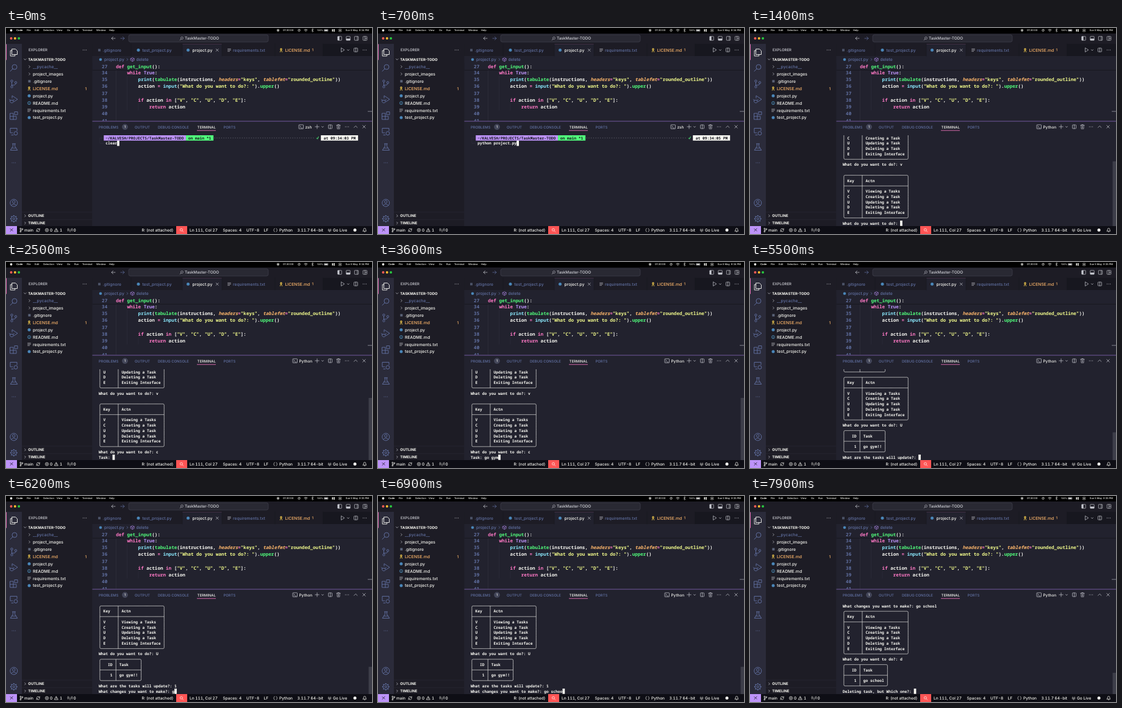
Write an HTML page that moves like this. It is 600x338 px and loops after 8 s.

```html
<!DOCTYPE html>
<html lang="en">
<head>
<meta charset="utf-8">
<title>Terminal to-do session</title>
<style>
html, body { margin: 0; width: 100%; height: 100%; overflow: hidden; background: #22222e; }
svg { display: block; width: 600px; height: 338px; }
text { font-family: Inter, "Open Sans", sans-serif; font-weight: 500; white-space: pre; text-rendering: geometricPrecision; }
.mono text { font-family: "Noto Sans Mono", "DejaVu Sans Mono", monospace; font-weight: 600; }
.status text { font-variant-numeric: tabular-nums; }
text.bold { font-weight: 700; }
</style>
</head>
<body>
<svg id="stage" viewBox="0 0 600 338" xmlns="http://www.w3.org/2000/svg"></svg>
<script>
const C = {
  bg: '#22222e', side: '#1d1c25', bar: '#2b2b3a', dark: '#17171f', base: '#0e0e15', fg: '#f8f8f2', dim: '#6272a4',
  pink: '#ff79c6', purple: '#bd93f9', green: '#50fa7b', cyan: '#8be9fd', orange: '#ffb86c',
  yellow: '#f1fa8c', red: '#ff5555', blue: '#4a86b8', icon: '#c9cad2'
};

const esc = s => s.replace(/&/g, '&amp;').replace(/</g, '&lt;');
const rect = (x, y, w, h, fill, more = '') =>
  `<rect x="${x}" y="${y}" width="${w}" height="${h}" fill="${fill}" ${more}/>`;
const dot = (x, y, r, fill) => `<circle cx="${x}" cy="${y}" r="${r}" fill="${fill}"/>`;
const line = (d, color = C.icon, w = 0.7) =>
  `<path d="${d}" fill="none" stroke="${color}" stroke-width="${w}" stroke-linecap="round" stroke-linejoin="round"/>`;
const ring = (x, y, r, color = C.icon, w = 0.7) =>
  `<circle cx="${x}" cy="${y}" r="${r}" fill="none" stroke="${color}" stroke-width="${w}"/>`;
const frame = (x, y, w, h, color = C.icon, lw = 0.7) =>
  rect(x, y, w, h, 'none', `stroke="${color}" stroke-width="${lw}" rx="0.6"`);
// y is the vertical middle of the text
const label = (x, y, s, size, fill = C.fg, more = '') =>
  `<text x="${x}" y="${y + size * 0.36}" font-size="${size}" fill="${fill}" ${more}>${esc(s)}</text>`;
const bold = 'class="bold"';
const dots = (x, y, color = C.icon) => [-2.6, 0, 2.6].map(d => dot(x + d, y, 0.6, color)).join('');
const down = (x, y, color = C.icon, r = 1.7) => line(`M${x - r} ${y - r / 2}l${r} ${r} ${r} ${-r}`, color);
const right = (x, y, color = C.icon, r = 1.7) => line(`M${x - r / 2} ${y - r}l${r} ${r} ${-r} ${r}`, color);
const cross = (x, y, r = 1.9, color = C.icon) =>
  line(`M${x - r} ${y - r}l${2 * r} ${2 * r}M${x + r} ${y - r}l${-2 * r} ${2 * r}`, color);
const lens = (x, y, r, color, w) => ring(x + r * .25, y - r * .25, r, color, w) +
  line(`M${x - r * .5} ${y + r * .5}l${-r} ${r}`, color, w);
const key = (x, y) => ring(x, y - 1.4, 1.2, '#e5c04b', 1.2) + line(`M${x - .5} ${y}l-1 3M${x + .5} ${y}l1 3`, '#e5c04b', 1);
const list = (x, y) => line([-2, 0, 2].map(d => `M${x - 2.4} ${y + d}h${d > 0 ? 3 : 4.8}`).join(''), C.icon, .7);
const split = (x, y) => frame(x - 3, y - 3, 6, 6) + line(`M${x} ${y - 3}v6`);

function menuBar() {
  const items = [['File', 34], ['Edit', 47], ['Selection', 61], ['View', 83], ['Go', 100], ['Run', 112],
    ['Terminal', 125], ['Window', 148], ['Help', 169]];
  return rect(0, 0, 600, 9, '#000') + dot(8.5, 3.8, 1.9, C.fg) +
    label(17, 3.8, 'Code', 4.1, C.fg, bold) +
    items.map(([s, x]) => label(x, 3.8, s, 4)).join('') +
    ring(446, 3.8, 1.8, C.fg, .6) + dot(446, 3.8, 1, C.fg) + label(454, 3.8, '01:30:00', 4.1) +
    ring(480.5, 3.8, 1.7, C.fg, .7) + line('M480.5 3.8l1-1', C.fg, .6) +
    line('M489 3q2.5-2 5 0M490 4.3q1.5-1.2 3 0M491.5 5.5h.1', C.fg, .7) +
    line('M501 2.4l3 3-1.5 1.2v-5.6l1.5 1.2-3 3', C.fg, .5) +
    label(510, 3.8, '100%', 3.7) + frame(521.5, 2.2, 6.5, 3.2, C.icon, .5) + rect(522.2, 2.9, 5.1, 1.8, C.fg) +
    rect(534.5, 2, 1.7, 3.8, C.fg) + rect(537, 2, 2, 1.6, C.fg) + rect(537, 4.2, 2, 1.6, C.fg) +
    frame(545.5, 2, 4.4, 1.5, C.fg, .5) + frame(545.5, 4.5, 4.4, 1.5, C.fg, .5) +
    '<text id="clock" x="595" y="5.25" font-size="4" fill="#f8f8f2" text-anchor="end"></text>';
}

function titleBar() {
  const pane = (x, part) => frame(x - 3.2, 13.8, 6.4, 6.4) + part;
  return rect(0, 9, 600, 17, C.side) +
    dot(8.5, 17, 2, '#ff5f57') + dot(14.8, 17, 2, '#febc2e') + dot(21.1, 17, 2, '#28c840') +
    line('M179 17h-6m2.5-2.5l-2.5 2.5 2.5 2.5') + line('M188 17h6m-2.5-2.5l2.5 2.5-2.5 2.5', C.dim) +
    rect(201, 11, 229, 12, '#292933', 'rx="3" stroke="#454653" stroke-width=".6"') +
    lens(288, 17, 1.9, C.icon, .6) + label(293, 17, 'TaskMaster-TODO', 6.4, '#d5d6dc') +
    pane(547, rect(543.8, 13.8, 2.8, 6.4, C.icon)) + pane(561, rect(557.8, 17.4, 6.4, 2.8, C.icon)) +
    pane(574.5, line('M575.8 14v6')) + pane(588.5, line('M588.5 14v6M588.5 17h3'));
}

function activityBar() {
  const c = C.dim, w = .9;
  return rect(0, 26, 26, 299, C.bar) + rect(0, 26.5, .9, 26, C.pink) +
    line('M10 34.5h5.5l3 3v6H10zM10 37H7.2v9h7.5v-2.5', C.fg, w) +
    lens(13, 65, 4, c, w) +
    ring(9.5, 87, 1.7, c, w) + ring(9.5, 96.5, 1.7, c, w) + ring(16, 89.5, 1.7, c, w) +
    line('M9.5 89v5.5M16 91.5q0 2.5-6.5 2.5', c, w) +
    line('M10 115v-4l9 6-6 4M7 118.5h5v3q-2.5 3-5 0zM5.5 117l1.5 1.5M13.5 117l-1.5 1.5', c, w) +
    line('M7 140h5v5h5v5H7zM7 145h5v5M14.3 137.5h4.7v4.7h-4.7z', c, w) +
    line('M11 172H7v-7.5h11v4M9 175.5h3', c, w) + ring(16, 172.8, 2.9, c, w) +
    line('M10.5 190h5M11.5 190v4l-4.3 6.5h11.6L14.5 194v-4M9.5 197h7', c, w) + dots(12.7, 221, c) +
    ring(12.8, 287, 6, c, w) + ring(12.8, 285.2, 2.2, c, w) + line('M8.7 291q4.1-4.5 8.2 0', c, w) +
    ring(12.8, 313, 4.4, c, w) + ring(12.8, 313, 1.7, c, w) +
    [0, 45, 90, 135].map(a =>
      `<g transform="rotate(${a} 12.8 313)">${line('M12.8 308.3v-.7M12.8 317.7v.7', c, 1.4)}</g>`).join('');
}

function sidebar() {
  const files = ['__pycache__', 'project_images', '.gitignore', 'LICENSE.md', 'project.py', 'README.md',
    'requirements.txt', 'test_project.py'];
  const mark = (i, y) => i < 2 ? right(38.5, y)
    : i === 2 ? rect(36.4, y - 2, 4, 4, '#5a6277')
    : i === 3 ? key(38, y)
    : i === 5 ? ring(38, y, 2.5, '#58a6d8') + line(`M38 ${y}v1.3M38 ${y - 1.3}v.05`, '#58a6d8')
    : i === 6 ? list(38, y) : dot(38, y, 2.5, C.blue);
  return rect(26, 26, 115.5, 299, C.side) + label(37, 36.3, 'EXPLORER', 6, '#d5d6dc') + dots(129, 36) +
    down(31.3, 51.5) + label(36.3, 51.5, 'TASKMASTER-TODO', 6, C.fg, bold) +
    files.map((s, i) => {
      const y = 63.5 + i * 11.93;
      return mark(i, y) + label(44, y, s, 6.85, i === 0 ? C.dim : i === 3 ? C.orange : C.fg);
    }).join('') +
    label(129.5, 99.3, '1', 6.4, C.orange) +
    line('M26 302h115M26 314.3h115', '#2e2e3a', .5) +
    right(31.5, 308.2) + label(36.3, 308.2, 'OUTLINE', 6, C.fg, bold) +
    right(31.5, 320) + label(36.3, 320, 'TIMELINE', 6, C.fg, bold);
}

function tabs() {
  const y = 36.3;
  return rect(141.5, 26, 458.5, 20, C.dark) +
    rect(141.5, 26, 378, 20, C.side) + rect(289, 26, 65, 20, C.bg) + rect(289, 26, 65, .5, '#5c3a56') +
    line('M205 26v20M289 26v20M354 26v20M441 26v20M519.5 26v20', C.dark, .5) +
    rect(151, 34.3, 4, 4, '#4b5266') + label(158.5, y, '.gitignore', 6.7, C.dim) +
    dot(217, y, 2.5, C.blue) + label(223.5, y, 'test_project.py', 6.75, C.dim) +
    dot(298.5, y, 2.5, C.blue) + label(305.5, y, 'project.py', 6.8) + cross(346.3, y) +
    list(366, y) + label(372, y, 'requirements.txt', 6.7, C.dim) +
    key(451, y) + label(457.5, y, 'LICENSE.md', 6.8, C.orange) + label(501.5, y, '1', 6, C.orange) +
    line('M549.8 32.8l5 3.2-5 3.2z') + down(561, 36.3, C.icon, 1.5) + split(573.5, 36) + dots(588, 36);
}

const code = [
  [27, 63, 0, 'p:def |g:get_input|f:():'],
  [34, 73, 4, 'p:while |v:True|f::'],
  [35, 84.2, 8, 'c:print|f:(|g:tabulate|f:(instructions, |o:headers|p:=|y:"keys"|f:, |o:tablefmt|p:=|y:"rounded_outline"|f:))'],
  [36, 95.5, 8, 'f:action |p:= |c:input|f:(|y:"What do you want to do?: "|f:).|g:upper|f:()'],
  [37, 106.8, 0, ''],
  [38, 118, 8, 'p:if |f:action |p:in |f:[|y:"V"|f:, |y:"C"|f:, |y:"U"|f:, |y:"D"|f:, |y:"E"|f:]:'],
  [39, 129.3, 12, 'p:return |f:action'],
  [40, 140.6, 0, ''],
  [41, 151.8, 0, '']
];
const ink = { p: C.pink, g: C.green, f: C.fg, v: C.purple, c: C.cyan, o: C.orange, y: C.yellow };
const ADVANCE = 0.6;

function editor() {
  const w = 4.548, size = w / ADVANCE;
  const rows = code.map(([n, y, indent, src]) => {
    const spans = src && src.split('|').map(s =>
      `<tspan fill="${ink[s[0]]}"${s[0] === 'o' ? ' font-style="italic"' : ''}>${esc(s.slice(2))}</tspan>`).join('');
    return label(166.2, y, String(n), size, C.dim, 'text-anchor="end"') +
      (src ? `<text x="${180.2 + indent * w}" y="${y + size * .36}" font-size="${size}">${spans}</text>` : '');
  });
  return rect(141.5, 46, 458.5, 279, C.bg) + dot(155, 51.7, 2.3, C.blue) +
    label(161, 51.7, 'project.py', 6.8, C.dim) + right(199, 51.7, C.dim) +
    line('M204.5 50.2l2.8-1.5 2.8 1.5v3l-2.8 1.5-2.8-1.5zM204.5 50.2l2.8 1.5 2.8-1.5M207.3 51.7v3', C.purple, .6) +
    label(213.5, 51.7, 'delete', 6.8, C.dim) +
    line('M180.5 69v83M198.7 79v56M216.9 124v11', '#343440', .5) +
    `<g class="mono" clip-path="url(#codeClip)">${rows.slice(1).join('')}` +
    rect(141.5, 57, 458.5, 11.5, C.bg) + rect(141.5, 68.7, 458.5, .9, C.dark) + rows[0] + '</g>' +
    rect(593, 136.4, 7, .9, '#8d8e98');
}

function panel() {
  const heads = [['PROBLEMS', 152], ['OUTPUT', 211], ['DEBUG CONSOLE', 249], ['TERMINAL', 313.5], ['PORTS', 356.5]];
  return rect(141.5, 152.8, 458.5, 172.2, C.bg) + rect(141.5, 152.6, 458.5, .8, '#8868b8') +
    heads.map(([s, x], i) => label(x, 162.5, s, 5.95, i === 3 ? C.fg : C.dim)).join('') +
    dot(195, 162.3, 4.8, '#44475a') + label(195, 162.3, '1', 5.4, C.fg, 'text-anchor="middle"') +
    rect(313, 167.7, 31, .8, C.pink) +
    `<g id="shellIcon">${frame(480, 158.8, 7.5, 6.6) + line('M481.7 160.5l1.6 1.6-1.6 1.6M484 164h1.8')}</g>` +
    '<text id="shell" y="164.6" font-size="6.4" fill="#f8f8f2"></text>' +
    line('M506.8 162h6.4M510 158.8v6.4') + down(519, 162.3, C.icon, 1.5) + split(531.5, 162) +
    line('M541.8 159.5h6.4M543.8 159.5v-1h2.4v1M542.6 159.5l.4 6h4l.4-6M544.4 161v3M545.6 161v3', C.icon, .6) +
    dots(559, 162) + line('M570.5 163.3l2.7-2.7 2.7 2.7') + cross(587, 162, 2.2);
}

function statusBar() {
  const y = 331.6;
  const items = [['main', 30], ['0', 72], ['1', 88], ['0', 110.5], ['R: (not attached)', 222.5], ['Ln 111, Col 27', 301],
    ['Spaces: 4', 355.5], ['UTF-8', 394], ['LF', 422.5], ['Python', 448], ['3.11.7 64-bit', 477.5], ['Go Live', 536]];
  return '<g class="status">' + rect(0, 325, 600, 13, C.base) + rect(0, 325, 18, 13, C.purple) +
    line('M7 329.5l2 2-2 2M11.2 329l-2 2 2 2', C.dark, .8) +
    ring(23.8, 329.3, 1, C.fg) + ring(23.8, 334, 1, C.fg) + ring(26.8, 330, 1, C.fg) +
    line('M23.8 330.3v2.7M26.8 331q0 1.3-3 1.5', C.fg) +
    line('M50.2 331.2a2.5 2.5 0 0 1 4.7-.7M55.2 332a2.5 2.5 0 0 1-4.7.7M55.2 329v1.7h-1.6M50.1 334v-1.5h1.6', C.fg) +
    ring(67, y, 2.6, C.fg) + cross(67, y, 1, C.fg) +
    line('M82.5 329l2.9 5h-5.8zM82.5 330.8v1.5', C.fg) +
    line('M105 331v3.5M103 329.5q-1 1.5 0 3M107 329.5q1 1.5 0 3M101.6 328.8q-1.6 2.4 0 4.6M108.4 328.8q1.6 2.4 0 4.6', C.fg, .6) +
    rect(279, 325, 18, 13, C.red) + ring(287.4, y - .5, 2, C.fg) + line(`M288.9 ${y + 1}l1.8 1.8`, C.fg) +
    line('M440.4 329q-1 0-1 1.2t-.8 1.4q.8.2.8 1.4t1 1.2M443 329q1 0 1 1.2t.8 1.4q-.8.2-.8 1.4t-1 1.2', C.fg, .6) +
    ring(530.5, y, .9, C.fg, .6) + line('M528.8 329.6q-1.4 2 0 4M532.2 329.6q1.4 2 0 4M530.5 332.5v2', C.fg, .6) +
    dot(572, y, 2.5, C.fg) +
    line('M585.2 333.2h5.6l-.9-1.2v-1.2q0-2.2-1.9-2.2t-1.9 2.2v1.2zM587.3 334.3h1.4', C.fg) +
    items.map(([s, x]) => label(x, y, s, 6.5)).join('') + '</g>';
}

const stage = document.getElementById('stage');
stage.innerHTML =
  '<defs><clipPath id="codeClip"><rect x="141.5" y="57" width="458.5" height="95.5"/></clipPath>' +
  '<clipPath id="termClip"><rect x="141.5" y="175.5" width="458.5" height="149.5"/></clipPath></defs>' +
  menuBar() + titleBar() + editor() + tabs() + sidebar() + activityBar() + panel() +
  '<g id="term" class="mono" clip-path="url(#termClip)"></g>' + statusBar();

// Terminal session
function table(w1, w2, head, rows) {
  const rule = (a, b, c) => a + '─'.repeat(w1) + b + '─'.repeat(w2) + c;
  const row = ([a, b]) => `│${a.padEnd(w1)}│${(' ' + b).padEnd(w2)}│`;
  return [rule('╭', '┬', '╮'), row(head), rule('├', '┼', '┤'), ...rows.map(row), rule('╰', '┴', '╯')];
}
const menu = table(7, 19, [' Key', 'Actn'], [[' V', 'Viewing a Tasks'], [' C', 'Creating a Task'],
  [' U', 'Updating a Task'], [' D', 'Deleting a Task'], [' E', 'Exiting Interface']]);
const tasks = s => table(6, s.length + 2, ['   ID', 'Task'], [['    1', s]]);
const what = 'What do you want to do?: ';

// type: time of the first key, gap: ms per key, enter: time of return
const steps = [
  { time: '09:34:03', ask: '   ', text: 'clear', type: -600, gap: 100, enter: 150, clear: true },
  { time: '09:34:05', ask: '   ', text: 'python project.py', type: 250, gap: 28, enter: 850, out: ['', ...menu], run: true },
  { ask: what, text: 'v', type: 1080, enter: 1300, out: ['', ...menu] },
  { ask: what, text: 'c', type: 1900, enter: 2200, out: [] },
  { ask: 'Task: ', text: 'go gym!!', type: 2700, gap: 160, enter: 4200, out: menu },
  { ask: what, text: 'v', type: 4600, enter: 4800, out: [...tasks('go gym!!'), ...menu] },
  { ask: what, text: 'U', type: 5080, enter: 5300, out: tasks('go gym!!') },
  { ask: 'What are the tasks will update?: ', text: '1', type: 5700, enter: 5900, out: [] },
  { ask: 'What changes you want to make?: ', text: 'go school', type: 6100, gap: 110, enter: 7150, out: menu },
  { ask: what, text: 'd', type: 7400, enter: 7650, out: tasks('go school') },
  { ask: 'Deleting task, but Which one?: ', text: '', type: 9000, enter: 9000 }
];

function session(t) {
  let lines = [], running = false;
  for (const s of steps) {
    if (s.time) lines.push({ time: s.time });
    const n = Math.max(0, Math.floor((t - s.type) / (s.gap || 100)) + 1);
    lines.push(s.ask + s.text.slice(0, n));
    if (t < s.enter) break;
    if (s.clear) lines = []; else lines.push(...s.out);
    running = running || !!s.run;
  }
  return { lines, running };
}

const X = 152, Y = 176, CW = 3.7625, RH = 8.75, ROWS = 17, FS = CW / ADVANCE;
const at = col => X + col * CW;
const h = CW / 2, v = RH / 2;
// Arms from the cell centre: left, right, up, down
const arms = { '─': 'lr', '│': 'ud', '├': 'rud', '┤': 'lud', '┬': 'lrd', '┴': 'lru', '┼': 'lrud' };
const arm = { l: `h${-h}`, r: `h${h}`, u: `v${-v}`, d: `v${v}` };
const bends = { '╭': [1, 1], '╮': [-1, 1], '╰': [1, -1], '╯': [-1, -1] };

function boxPath(s, row) {
  let d = '';
  [...s].forEach((ch, i) => {
    const x = at(i) + h, y = Y + row * RH + v;
    if (arms[ch]) for (const a of arms[ch]) d += `M${x} ${y}${arm[a]}`;
    else if (bends[ch]) {
      const [sx, sy] = bends[ch];
      d += `M${x + sx * h} ${y}Q${x} ${y} ${x} ${y + sy * h}V${y + sy * v}`;
    }
  });
  return d;
}

function prompt(row, time) {
  const y = Y + row * RH, mid = y + v, put = (c, s, color, more) => label(at(c), mid, s, FS, color, more);
  const block = (a, b, color) => rect(at(a), y, (b - a) * CW, RH, color);
  return line(`M${at(2)} ${mid}H${at(.5)}V${mid + RH}H${at(2)}`, '#343543', .5) +
    block(2.2, 38, C.purple) + put(3, '~/KALVESH/PROJECTS/', C.dark) +
    put(22, 'TaskMaster-TODO', C.dark, bold) +
    block(38, 50, C.green) + put(39, 'on main *1', C.dark) +
    `<path d="M${at(50.4)} ${mid}H${at(94)}" stroke="#8a8c99" stroke-width=".7" stroke-dasharray="1 ${CW - 1}"/>` +
    line(`M${at(95)} ${mid + .3}l1 1.5 1.8-3.6`, C.green, 1) +
    block(96.8, 113, C.fg) + put(98, `at ${time} PM`, C.dark);
}

const find = id => document.getElementById(id);
const term = find('term'), shell = find('shell'), shellIcon = find('shellIcon'), clock = find('clock');

function drawTerminal({ lines, running }) {
  const seen = lines.slice(-ROWS), last = seen.length - 1;
  let out = '', path = '';
  seen.forEach((s, row) => {
    if (s.time) { out += prompt(row, s.time); return; }
    path += boxPath(s, row);
    out += label(X, Y + row * RH + v, s.replace(/[─-╿]/g, ' '), FS);
  });
  out += `<path d="${path}" fill="none" stroke="#e6e6e3" stroke-width=".7"/>` +
    rect(at(seen[last].length), Y + last * RH, CW, RH, C.fg);
  if (lines.length > ROWS) {
    const size = 150 * ROWS / lines.length;
    out += rect(594.5, 325 - size, 5.5, size, '#3d3e49');
  }
  term.innerHTML = out;
  shell.textContent = running ? 'Python' : 'zsh';
  shell.setAttribute('x', running ? 480.5 : 490.5);
  shellIcon.setAttribute('transform', `translate(${running ? -10 : 0})`);
}

let shown = '';
function tick(now) {
  const t = now % 8000, state = session(t), id = JSON.stringify(state);
  if (id !== shown) { drawTerminal(state); shown = id; }
  const time = t < 5000 ? 'Sun 5 May  9:34 PM' : 'Sun 5 May  9:35 PM';
  if (clock.textContent !== time) clock.textContent = time;
  requestAnimationFrame(tick);
}
tick(performance.now());
</script>
</body>
</html>
```
